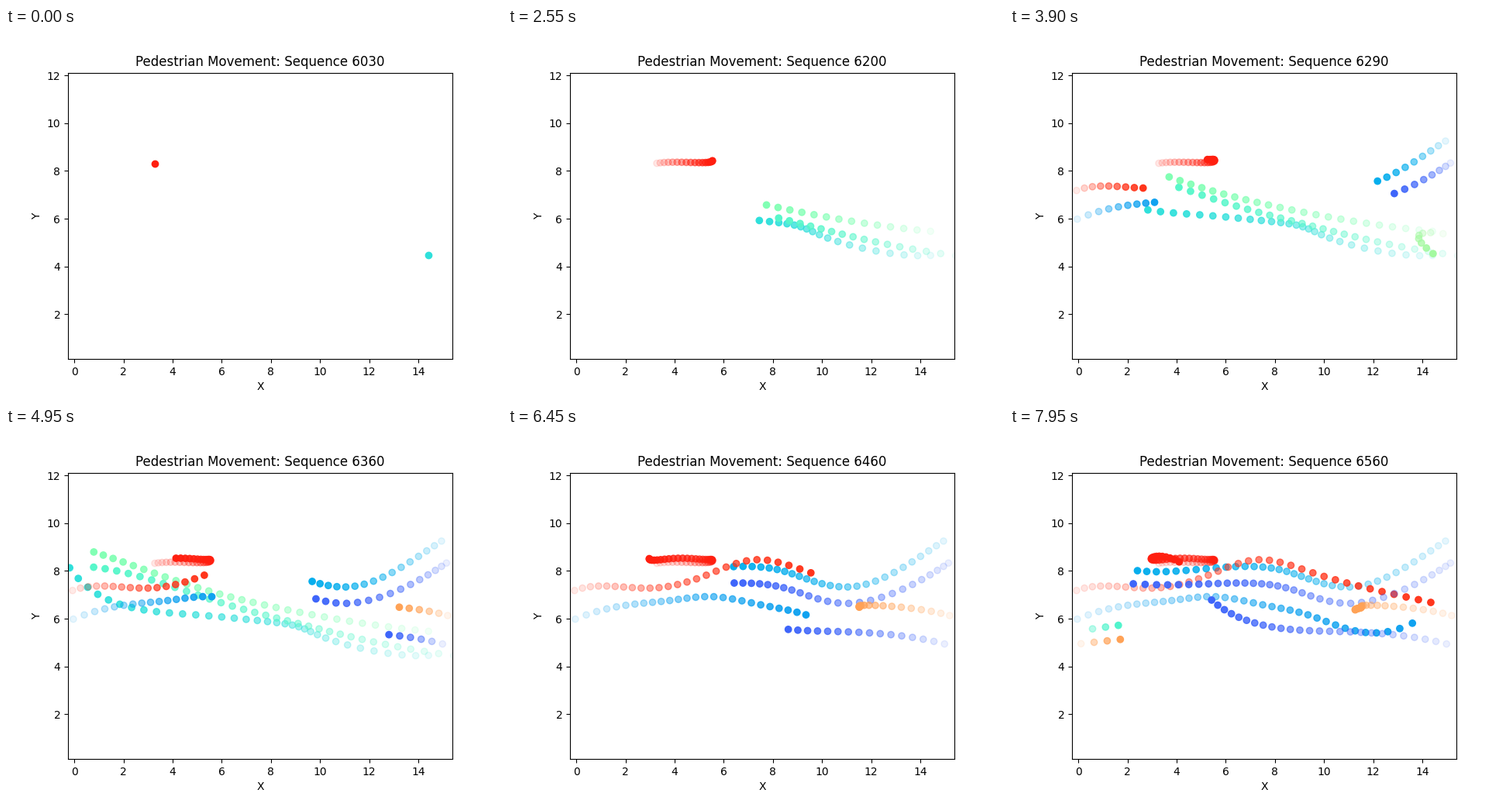
A matplotlib script that plays this animation: 640x480 px, repeating every 8000 ms.

```python
import numpy as np
import matplotlib.pyplot as plt
from matplotlib.animation import FuncAnimation

TICK_MS, LOOP_MS, STEP_MS = 50, 8000, 150
FIRST_SEQUENCE, SEQUENCE_STRIDE = 6030, 10
LAST_STEP = (LOOP_MS - TICK_MS) // STEP_MS
OLDEST_ALPHA = 0.1


def spline(keys, u):
    """Cubic spline through evenly spaced keys, evaluated at u in 0..1."""
    knots = np.linspace(0, 1, len(keys))

    def basis(v):
        powers = [v**p for p in range(min(len(keys), 4))]
        bends = [np.maximum(v - k, 0)**3 for k in knots[2:-2]]
        return np.column_stack(powers + bends)

    return basis(u) @ np.linalg.solve(basis(knots), keys)


class Walker:
    """A pedestrian seen from step `first` to `last`, leaving a fading trail."""

    def __init__(self, ax, hue, x_keys, y_keys, first=0, last=LAST_STEP):
        self.first, self.last = first, last
        self.color = plt.cm.rainbow(hue)[:3]
        u = np.linspace(0, 1, last - first + 1)
        self.path = np.column_stack([spline(x_keys, u), spline(y_keys, u)])
        self.dots = ax.scatter([], [])

    def show(self, step):
        present = self.first <= step <= self.last
        self.dots.set_visible(present)
        if present:
            count = step - self.first + 1
            alphas = np.linspace(1, OLDEST_ALPHA, count)[::-1]
            rgba = [(*self.color, alpha) for alpha in alphas]
            self.dots.set_offsets(self.path[:count])
            self.dots.set_facecolor(rgba)
            self.dots.set_edgecolor(rgba)


fig, ax = plt.subplots(figsize=(6.4, 4.8), dpi=100)
ax.set(xlim=(-0.267, 15.393), ylim=(0.117, 12.117), xlabel="X", ylabel="Y")
title = ax.set_title("")

walkers = [
    # Pacing back and forth
    Walker(ax, 0.96, [3.27, 4.4, 5.38, 5.52, 5.2, 4.11, 3.09, 3.12, 4.1],
           [8.32, 8.36, 8.36, 8.47, 8.48, 8.53, 8.45, 8.6, 8.38]),
    # Early group crossing to the left
    Walker(ax, 0.34,
           [14.42, 12.13, 10.14, 9.04, 7.66, 5.67, 3.47, 1.44, -0.2],
           [4.46, 4.83, 5.57, 5.9, 6.16, 6.53, 8.13], last=33),
    Walker(ax, 0.42, [15.45, 11.9, 9.02, 6.06, 2.95, -0.15],
           [4.45, 5.09, 5.82, 6.64, 7.68, 8.2], first=2, last=35),
    Walker(ax, 0.5, [14.42, 11.1, 8.02, 5.2, 2.48, 0.05],
           [5.47, 5.91, 6.51, 7.24, 8.19, 9.02], first=4, last=35),
    # Later walkers from both sides
    Walker(ax, 0.24, [14.95, 12.56, 10, 7.85, 5.2, 2.4],
           [9.25, 8.15, 7.36, 7.56, 8.06, 8.18, 8.02, 8.01], first=18),
    Walker(ax, 0.22, [-0.05, 2.74, 5.22, 7.88, 10.47, 13.6],
           [5.98, 6.56, 6.76, 6.92, 6.58, 6.16, 5.49, 5.81], first=18),
    Walker(ax, 0.93, [-0.08, 6.3, 14.35],
           [7.18, 7.35, 7.3, 7.82, 8.47, 7.92, 7.25, 6.68], first=18),
    Walker(ax, 0.13, [15.15, 12.95, 9.99, 7.66, 5.22, 2.23],
           [8.33, 7.3, 6.64, 7.2, 7.49, 7.44, 7.46], first=19),
    Walker(ax, 0.13, [14.99, 11.36, 8, 5.42],
           [4.94, 5.33, 5.46, 5.55, 5.93, 6.78], first=28),
    # Turning round, slowing down and just entering
    Walker(ax, 0.57, [14.85, 13.87, 14.17, 15.1], [5.37, 5.3, 4.77, 4.03],
           first=19, last=28),
    Walker(ax, 0.78, [15.2, 13.23, 11.72, 11.52, 11.4, 11.27],
           [6.13, 6.48, 6.56, 6.48, 6.43, 6.37], first=28),
    Walker(ax, 0.78, [0.1, 1.7], [4.95, 5.13], first=50),
    Walker(ax, 0.41, [-0.45, 0.57, 1.1, 1.62], [5.5, 5.72], first=50),
]


def draw(tick):
    step = tick * TICK_MS // STEP_MS
    sequence = FIRST_SEQUENCE + SEQUENCE_STRIDE * step
    title.set_text(f"Pedestrian Movement: Sequence {sequence}")
    for walker in walkers:
        walker.show(step)


anim = FuncAnimation(fig, draw, frames=LOOP_MS // TICK_MS, interval=TICK_MS,
                     repeat=True, repeat_delay=0)
plt.show()
```
